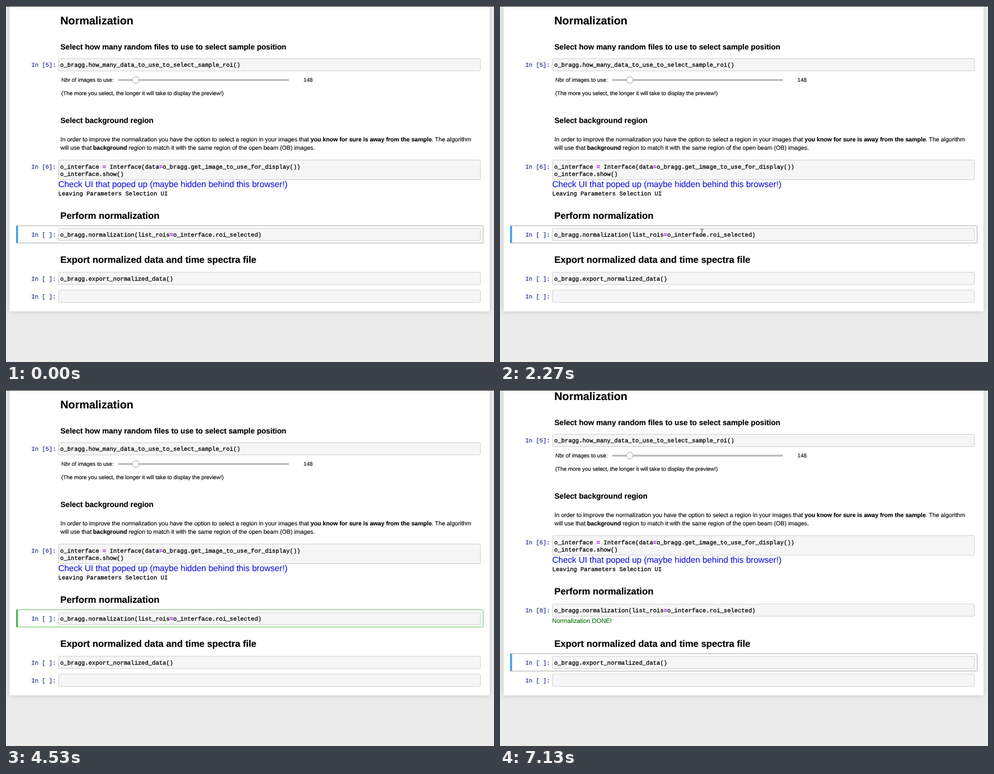
An HTML page for the animation above (8000 ms loop, 876x639 px).

```html
<!DOCTYPE html>
<html lang="en">
<head>
<meta charset="utf-8">
<title>Notebook normalization</title>
<style>
  html, body { margin: 0; width: 100%; height: 100%; overflow: hidden; background: #ebebeb; }
  svg { display: block; }
  text {
    font-family: "Liberation Sans", Arial, sans-serif;
    text-rendering: geometricPrecision;
    white-space: pre;
    fill: var(--ink, #000);
    stroke: var(--ink, #000);
    stroke-width: .15px;
  }
  .h1, .h2, .h3, .b { font-weight: bold; }
  .h1 { font-size: 19.85px; }
  .h2 { font-size: 16.75px; }
  .h3 { font-size: 13.62px; }
  .p { font-size: 10.65px; }
  .label { font-size: 9.9px; }
  .notice { font-size: 15.28px; --ink: #1a1add; }
  .done { font-size: 11.2px; --ink: #0c760c; }
  .code { font: 10.57px "Liberation Mono", "Courier New", monospace; stroke-width: .3px; }
  .in { --ink: #303f8f; }
  .op { fill: #a2f; stroke: #a2f; font-weight: bold; }
  .cell { x: 94.5px; width: 757px; fill: #f6f6f6; stroke: #cfcfcf; rx: 1px; }
  .sheet { fill: #fff; filter: drop-shadow(0 0 5px rgba(87, 87, 87, .25)); }

  .upper, .pending, .finished, .frame, .bar, .caret, .pointer, .arrow, .beam {
    animation: 8s step-end infinite;
  }
  .upper { animation-name: scroll; }
  .pending { animation-name: pending; }
  .finished { animation-name: finished; }
  .frame, .bar { animation-name: select; }
  .frame { x: 18.5px; width: 838px; rx: 1px; fill-opacity: 0; }
  .bar { x: 18px; width: 3.6px; stroke-width: 0; }
  .caret { animation-name: blink; }
  .pointer { animation-name: move; }
  .arrow { animation-name: arrow; }
  .beam { animation-name: beam; }

  @keyframes scroll {
    0% { transform: none; }
    57.5%, 100% { transform: translateY(-15px); }
  }
  @keyframes pending {
    0% { opacity: 1; }
    57.5%, 100% { opacity: 0; }
  }
  @keyframes finished {
    0% { opacity: 0; }
    57.5%, 100% { opacity: 1; }
  }
  @keyframes select {
    0% { y: 394.5px; height: 31px; stroke: #ababab; fill: #42a0e8; }
    32.5% { y: 394.5px; height: 31px; stroke: #66bb6a; fill: #5cb062; }
    57.5% { y: 426.5px; height: 46px; stroke: #ababab; fill: #42a0e8; }
    89.125%, 100% { y: 473.3px; height: 31.2px; stroke: #ababab; fill: #42a0e8; }
  }
  @keyframes blink {
    0%, 39.125%, 51.625%, 100% { opacity: 0; }
    32.5%, 45% { opacity: 1; }
  }
  @keyframes arrow {
    0%, 13.375%, 100% { opacity: 0; }
    5.875% { opacity: 1; }
  }
  @keyframes beam {
    0%, 56.625%, 100% { opacity: 0; }
    13.375% { opacity: 1; }
  }
  @keyframes move {
    0%, 5.875% { transform: translate(806px, 318px); }
    6.625% { transform: translate(720px, 325px); }
    7.5% { transform: translate(620px, 335px); }
    8.375% { transform: translate(530px, 346px); }
    9.125% { transform: translate(460px, 356px); }
    10% { transform: translate(412px, 365px); }
    10.875% { transform: translate(383px, 372px); }
    11.625% { transform: translate(368px, 378px); }
    12.5% { transform: translate(352px, 392px); }
    13.375% { transform: translate(340px, 408px); }
    14.125% { transform: translate(343px, 411.5px); }
    18.375% { transform: translate(344px, 411px); }
    19.125% { transform: translate(346px, 410px); }
    20% { transform: translate(349px, 408px); }
    20.875% { transform: translate(352px, 407px); }
    21.625% { transform: translate(355px, 406px); }
    22.5% { transform: translate(358px, 406px); }
    23.375% { transform: translate(360px, 406px); }
    24.125% { transform: translate(361px, 406px); }
    25% { transform: translate(361.5px, 406.5px); }
    28.375% { transform: translate(362.5px, 406.5px); }
    29.125%, 100% { transform: translate(363.5px, 406.5px); }
  }
</style>
</head>
<body>
<svg width="876" height="639" viewBox="0 0 876 639">
  <rect class="sheet" x="6.5" y="-30" width="861.5" height="578"/>

  <g class="upper">
    <text class="h1" x="97.5" y="33">Normalization</text>
    <text class="h3" x="97.8" y="78.2">Select how many random files to use to select sample position</text>
    <rect class="cell" y="94.5" height="22"/>
    <text class="code in" x="45.4" y="109">In [5]:</text>
    <text class="code" x="97.3" y="109">o_bragg.how_many_data_to_use_to_select_sample_roi()</text>

    <text class="label" x="99.3" y="136">Nbr of images to use:</text>
    <rect x="201.5" y="131.2" width="306.5" height="3.2" rx="1" fill="#b8b8b8"/>
    <circle cx="233" cy="132.8" r="6" fill="#fff" stroke="#a0a0a0"/>
    <text class="label" x="534" y="136">148</text>
    <text class="label" x="99.3" y="160.2">(The more you select, the longer it will take to display the preview!)</text>

    <text class="h3" x="97.8" y="210.3">Select background region</text>
    <text class="p" x="97.8" y="243.4">In order to improve the normalization you have the option to select a region in your images that <tspan class="b">you know for sure is away from the sample</tspan>. The algorithm</text>
    <text class="p" x="97.8" y="258.4">will use that <tspan class="b">background</tspan> region to match it with the same region of the open beam (OB) images.</text>

    <rect class="cell" y="276.5" height="35"/>
    <text class="code in" x="45.4" y="291.7">In [6]:</text>
    <text class="code" x="97.3" y="291.7">o_interface <tspan class="op">=</tspan> Interface(data<tspan class="op">=</tspan>o_bragg.get_image_to_use_for_display())</text>
    <text class="code" x="97.3" y="304.5">o_interface.show()</text>
    <text class="notice" x="93.7" y="325.3">Check UI that poped up (maybe hidden behind this browser!)</text>
    <text class="code" x="93.8" y="339.5">Leaving Parameters Selection UI</text>

    <text class="h2" x="97.6" y="382.3">Perform normalization</text>
    <rect class="cell" y="399.2" height="22"/>
    <text class="code in pending" x="45.4" y="414.2">In [ ]:</text>
    <text class="code in finished" x="45.4" y="414.2">In [8]:</text>
    <text class="code" x="97.3" y="414.2">o_bragg.normalization(list_rois<tspan class="op">=</tspan>o_interface.roi_selected)</text>
  </g>

  <text class="done finished" x="93.6" y="417.6">Normalization DONE!</text>

  <text class="h2" x="97.6" y="460.5">Export normalized data and time spectra file</text>
  <rect class="cell" y="478" height="22"/>
  <text class="code in" x="45.4" y="493">In [ ]:</text>
  <text class="code" x="97.3" y="493">o_bragg.export_normalized_data()</text>
  <rect class="cell" y="510" height="22"/>
  <text class="code in" x="45.4" y="524.7">In [ ]:</text>

  <rect class="frame"/>
  <rect class="bar"/>
  <rect class="caret" x="364.6" y="404" width="1" height="13"/>

  <g class="pointer">
    <path class="arrow" d="M0 0V10.4L2.4 8.2L4.1 12L5.9 11.2L4.2 7.6H7.4Z" stroke="#fff" stroke-width=".7"/>
    <path class="beam" d="M-3 -5.8Q-.4 -5.8 0 -4.6Q.4 -5.8 3 -5.8M0 -4.6V4.6M-3 5.8Q-.4 5.8 0 4.6Q.4 5.8 3 5.8" fill="none" stroke="#222"/>
  </g>

  <rect width="876" height="1" fill="#1c1c1c"/>
</svg>
</body>
</html>
```
